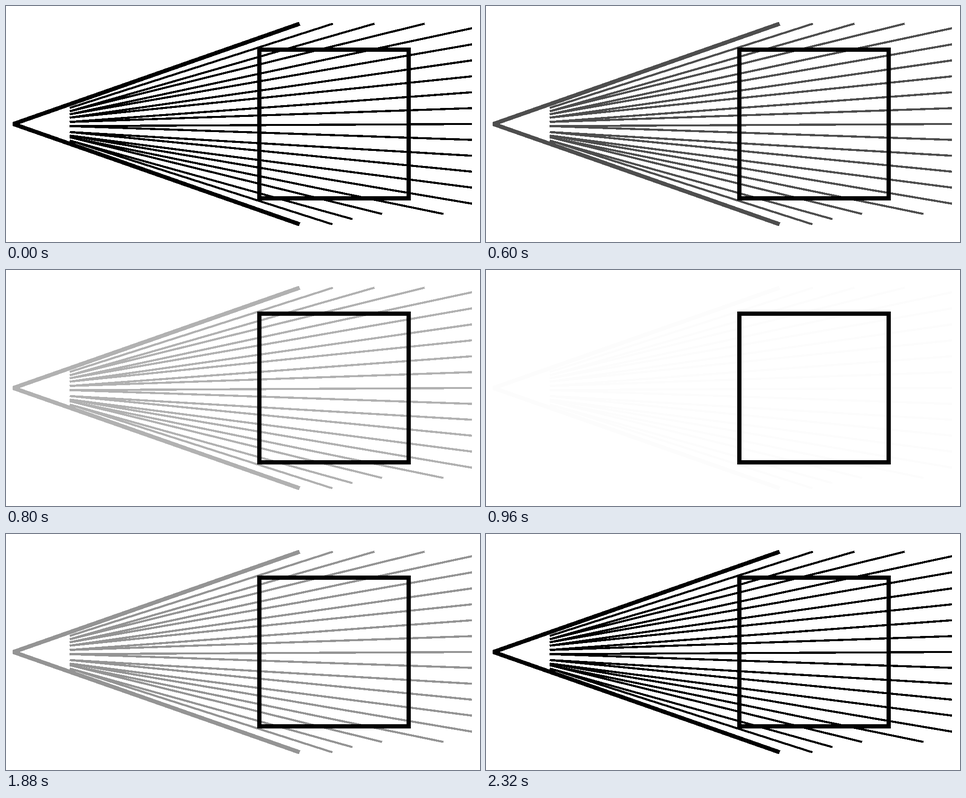
An HTML page that plays this animation: 1000 by 500 pixels, repeating every 2400 ms.

```html
<!DOCTYPE html>
<html>
<head>
<meta charset="utf-8">
<style>
  html, body { margin: 0; width: 100%; height: 100%; overflow: hidden; background: #fff; }
  svg { display: block; width: 1000px; height: 500px; }
</style>
</head>
<body>
<svg viewBox="0 0 1000 500" fill="none" shape-rendering="crispEdges">
  <g id="fan" stroke="#000">
    <path d="M619.5 37.5L15.5 250L619.5 462.5" stroke-width="8.7" stroke-linejoin="bevel"/>
    <path id="rays" stroke-width="4.4"/>
  </g>
  <rect x="534.5" y="92.5" width="315" height="315" stroke="#000" stroke-width="9"/>
</svg>
<script>
const LOOP = 2400, FRAME = 40;
const LEFT = 134.5, RIGHT = 983, TOP = 37.5, BOTTOM = 440.5;
const fan = document.getElementById('fan');

// Neighbouring rays share a start height
const starts = [216, 223, 229.5, 236.5, 245.7, 254.5, 267, 274.5, 278, 285];

// k runs from -9 (top) to 9 (bottom); rays spread evenly at the right edge
function ray(k) {
  const y0 = starts[Math.floor((k + 10) / 2)];
  const yEdge = 250 + 33.6 * k + 0.006 * k ** 3;
  const low = BOTTOM + 11 * Math.max(0, k - 7);
  const y = Math.max(TOP, Math.min(low, yEdge));
  const x = LEFT + (RIGHT - LEFT) * (y - y0) / (yEdge - y0);
  return `M${LEFT} ${y0}L${x} ${y}`;
}
document.getElementById('rays').setAttribute('d',
  Array.from({ length: 19 }, (_, i) => ray(i - 9)).join(''));

// Grey level: fades out in 13 steps, back in over 19 frames shown mostly in twos
function greyAt(t) {
  if (t < 480) return 0;
  if (t < 1640) return Math.min(252, 255 * (Math.floor((t - 480) / FRAME) + 1) / 13);
  const step = t < 2320 ? 2 * Math.floor((t - 1560) / (2 * FRAME)) : 19;
  return 255 * (1 - step / 19);
}

function draw() {
  const grey = Math.round(greyAt(performance.now() % LOOP));
  fan.setAttribute('stroke', `rgb(${grey},${grey},${grey})`);
  requestAnimationFrame(draw);
}
draw();
</script>
</body>
</html>
```
